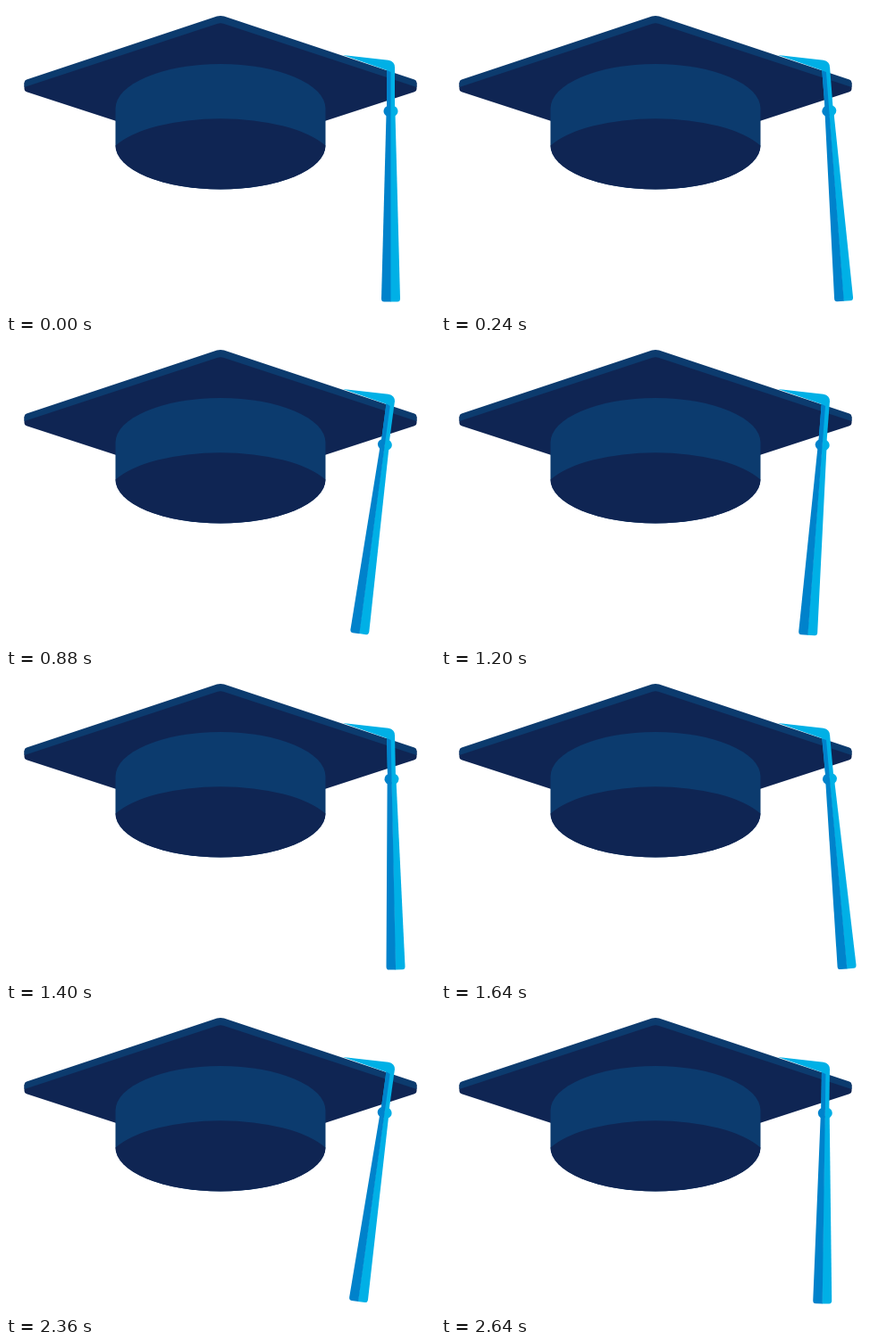
An HTML page with a canvas that plays this animation: 480 px wide and 343 px high, repeating every 2.68 s.

```html
<!DOCTYPE html>
<html lang="en">
<head>
<meta charset="utf-8">
<title>Graduation cap</title>
<style>
html, body { margin: 0; width: 100%; height: 100%; overflow: hidden; background: #fff; }
canvas { display: block; width: 480px; height: 343px; }
</style>
</head>
<body>
<canvas id="stage"></canvas>
<script>
const canvas = document.getElementById('stage');
const ctx = canvas.getContext('2d');
const ratio = window.devicePixelRatio || 1;
canvas.width = 480 * ratio;
canvas.height = 343 * ratio;

const NAVY = '#0f2553', SIDE = '#0c3b6e', BLUE = '#0082cb', CYAN = '#00b0e6';
const LOOP = 2680, STEP = 40, PERIOD = LOOP / 2;
const PIVOT = { x: 430.5, y: 68 }, LENGTH = 263;

// One swing: time in ms, sideways offset of the tassel's end in px.
const SWING = [
  [0, 0], [300, 23.8], [420, 28.5], [480, 26.2], [560, 17.8], [700, -8],
  [880, -35], [950, -37.8], [1200, -20], [1300, -3.8]
];

function keyAt(i) {
  const n = SWING.length, turn = Math.floor(i / n);
  const [t, v] = SWING[i - turn * n];
  return [t + turn * PERIOD, v];
}

function slopeAt(i) {
  const [a, b, c] = [keyAt(i - 1), keyAt(i), keyAt(i + 1)];
  const before = (b[1] - a[1]) / (b[0] - a[0]);
  const after = (c[1] - b[1]) / (c[0] - b[0]);
  if (before * after <= 0) return 0;
  const w = (b[0] - a[0]) / (c[0] - a[0]);
  return before * (1 - w) + after * w;
}

function swingOffset(time) {
  const t = time % PERIOD;
  let i = 0;
  while (keyAt(i + 1)[0] <= t) i++;
  const [t0, v0] = keyAt(i), [t1, v1] = keyAt(i + 1);
  const d = t1 - t0, s = (t - t0) / d, r = 1 - s;
  return r * r * (1 + 2 * s) * v0 + s * s * (3 - 2 * s) * v1
    + d * s * r * (r * slopeAt(i) - s * slopeAt(i + 1));
}

function fill(color, path) {
  ctx.fillStyle = color;
  ctx.fill(new Path2D(path));
}

function drawBoard() {
  fill(NAVY, 'M20.5 86 L240 14 L459.5 86 V93 Q459.5 95.5 457 96.3 L240 167 L23 96.3 Q20.5 95.5 20.5 93Z');
  fill(SIDE, 'M20.5 91 V86 Q20.5 83.3 23 82.5 L236 11.6 Q240 10.2 244 11.6 L457 82.5 Q459.5 83.3 459.5 86 V91 L244 20 Q240 18.6 236 20Z');
}

function drawCap() {
  fill(SIDE, 'M122.5 156 V115 A117.5 50 0 0 1 357.5 115 V156 A117.5 49.5 0 0 1 122.5 156Z');
  fill(NAVY, 'M122.5 156.5 A128 50 0 0 1 357.5 156.5 A117.5 49 0 0 1 122.5 156.5Z');
}

function drawTassel(time) {
  fill(CYAN, 'M377 55 L428 60.8 Q435 62 435 69 L431 74 L426 72Z');

  ctx.save();
  ctx.translate(PIVOT.x, PIVOT.y);
  ctx.rotate(-Math.asin(swingOffset(time) / LENGTH));
  ctx.translate(-PIVOT.x, -PIVOT.y);
  fill(CYAN, 'M426 69 Q430.5 64 435 69 V114 H426Z');
  fill(BLUE, 'M426 72 L430.5 74 V114 H426Z');
  fill(CYAN, 'M430 121 H435.5 L441 328 Q441 331.5 438 331.5 H430Z');
  fill(BLUE, 'M425.5 121 H430.5 V331.5 H423 Q420 331.5 420 328Z');
  fill(CYAN, 'M430 112 H434.5 Q438.5 114 438.5 118 Q438.5 121 435 123.5 H430Z');
  fill(BLUE, 'M430.5 112 H426.5 Q422.5 114 422.5 118 Q422.5 121 426 123.5 H430.5Z');
  ctx.restore();
}

function draw(now) {
  const time = Math.floor((now % LOOP) / STEP) * STEP;
  ctx.setTransform(ratio, 0, 0, ratio, 0, 0);
  ctx.fillStyle = '#fff';
  ctx.fillRect(0, 0, 480, 343);
  drawBoard();
  drawCap();
  drawTassel(time);
}

let start;
function tick(now) {
  if (start === undefined) start = now;
  draw(now - start);
  requestAnimationFrame(tick);
}
draw(0);
requestAnimationFrame(tick);
</script>
</body>
</html>
```
